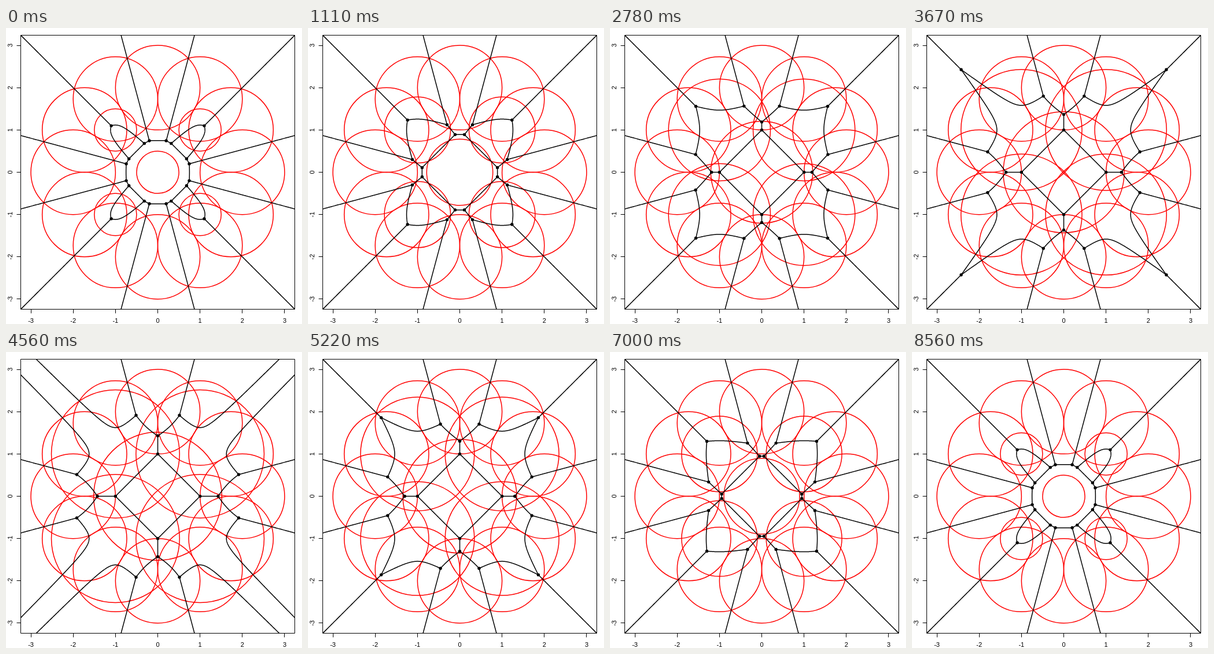
These frames come from a looping animation (512x512 px, 8.67 s). An HTML page:

```html
<!DOCTYPE html>
<html lang="en">
<head>
<meta charset="utf-8">
<title>Weighted Voronoi diagram of circles</title>
<style>
  html, body { margin: 0; width: 100%; height: 100%; overflow: hidden; background: #fff; }
  svg { display: block; width: 100vw; height: 100vh; }
  text { font: 11px "Liberation Sans", Arial, sans-serif; text-anchor: middle; }
</style>
</head>
<body>
<svg viewBox="0 0 512 512">
  <clipPath id="win"><rect x="25.5" y="12.5" width="474" height="474"/></clipPath>
  <rect width="512" height="512" fill="#fff"/>
  <g clip-path="url(#win)">
    <g id="rings" fill="none" stroke="#f00" stroke-width="1.5"></g>
    <path id="edges" fill="none" stroke="#000" stroke-width="1.5" stroke-linejoin="round" stroke-linecap="round"/>
    <g id="dots"></g>
  </g>
  <path id="axes" fill="none" stroke="#000" stroke-width="1"/>
  <g id="labels"></g>
</svg>
<script>
const LOOP = 8670, FPS = 9, LAST = 77;
const R0 = 0.5, STEP = 1.1 / 39;
const SCALE = 73.15, CX = 262.5, CY = 249.5;
const SAMPLES = 300, REACH = 7;

const $ = id => document.getElementById(id);
const px = x => (CX + x * SCALE).toFixed(2);
const py = y => (CY - y * SCALE).toFixed(2);

// Five growing circles inside a ring of twelve fixed ones
const sites = [[0, 0], [1, 1], [-1, 1], [-1, -1], [1, -1]].map(([x, y]) => ({ x, y, r: R0, grows: true }));
for (let k = 0; k < 12; k++) {
  const a = k * Math.PI / 6;
  sites.push({ x: 2 * Math.cos(a), y: 2 * Math.sin(a), r: 1 });
}

const pairs = [];
sites.forEach((p, i) => sites.slice(i + 1).forEach(q => {
  const len = Math.hypot(q.x - p.x, q.y - p.y);
  if (len < 2.01) pairs.push({ p, q, len });
}));

function dist(s, x, y) {
  const dx = x - s.x, dy = y - s.y;
  return Math.sqrt(dx * dx + dy * dy) - s.r;
}

// Visible parts of the hyperbola between two circles
function trace({ p, q, len }, addRun, addVertex) {
  const c = len / 2, a = (p.r - q.r) / 2;
  if (Math.abs(a) >= c) return;
  const b = Math.sqrt(c * c - a * a);
  const ex = (q.x - p.x) / len, ey = (q.y - p.y) / len;
  const mx = (p.x + q.x) / 2, my = (p.y + q.y) / 2;
  const at = u => {
    const s = a * Math.cosh(u), t = b * Math.sinh(u);
    return [mx + s * ex - t * ey, my + s * ey + t * ex];
  };
  const visible = u => {
    const [x, y] = at(u), d = dist(p, x, y) - 1e-9;
    return sites.every(s => s === p || s === q || dist(s, x, y) >= d);
  };
  const boundary = (inside, outside) => {
    for (let i = 0; i < 36; i++) {
      const mid = (inside + outside) / 2;
      if (visible(mid)) inside = mid; else outside = mid;
    }
    const v = at(inside);
    addVertex(v);
    return v;
  };
  const du = Math.asinh(REACH / b) / SAMPLES;
  let run = null;
  for (let i = -SAMPLES; i <= SAMPLES; i++) {
    const u = i * du;
    if (visible(u)) {
      if (!run) run = i > -SAMPLES ? [boundary(u, u - du)] : [];
      run.push(at(u));
    } else if (run) {
      run.push(boundary(u - du, u));
      addRun(run);
      run = null;
    }
  }
  if (run) addRun(run);
}

function draw(step) {
  const r = R0 + STEP * Math.min(step, LAST - step);
  for (const s of sites) if (s.grows) s.r = r;

  $("rings").innerHTML = sites.map(s =>
    `<circle cx="${px(s.x)}" cy="${py(s.y)}" r="${(s.r * SCALE).toFixed(2)}"/>`).join("");

  let path = "";
  const vertices = [];
  const addRun = pts => { path += "M" + pts.map(([x, y]) => px(x) + " " + py(y)).join("L"); };
  const addVertex = v => {
    if (!vertices.some(w => Math.hypot(v[0] - w[0], v[1] - w[1]) < 1e-4)) vertices.push(v);
  };
  for (const pair of pairs) trace(pair, addRun, addVertex);
  $("edges").setAttribute("d", path);
  $("dots").innerHTML = vertices.map(([x, y]) =>
    `<circle cx="${px(x)}" cy="${py(y)}" r="2.7"/>`).join("");
}

function drawAxes() {
  let path = "M25.5 12.5H499.5V486.5H25.5Z", labels = "";
  for (let v = -3; v <= 3; v++) {
    const x = Math.floor(px(v)) + 0.5, y = Math.floor(py(v)) + 0.5;
    path += `M${x} 486.5V493.5M25.5 ${y}H18.5`;
    labels += `<text x="${px(v)}" y="510">${v}</text>` +
      `<text transform="translate(10.5 ${py(v)}) rotate(-90)">${v}</text>`;
  }
  $("axes").setAttribute("d", path);
  $("labels").innerHTML = labels;
}

let shown = -1;
const start = performance.now();
function tick(now) {
  const t = Math.max(0, now - start) % LOOP;
  const step = Math.min(LAST, Math.floor((t + 5) * FPS / 1000));
  if (step !== shown) draw(shown = step);
  requestAnimationFrame(tick);
}
drawAxes();
tick(start);
</script>
</body>
</html>
```
